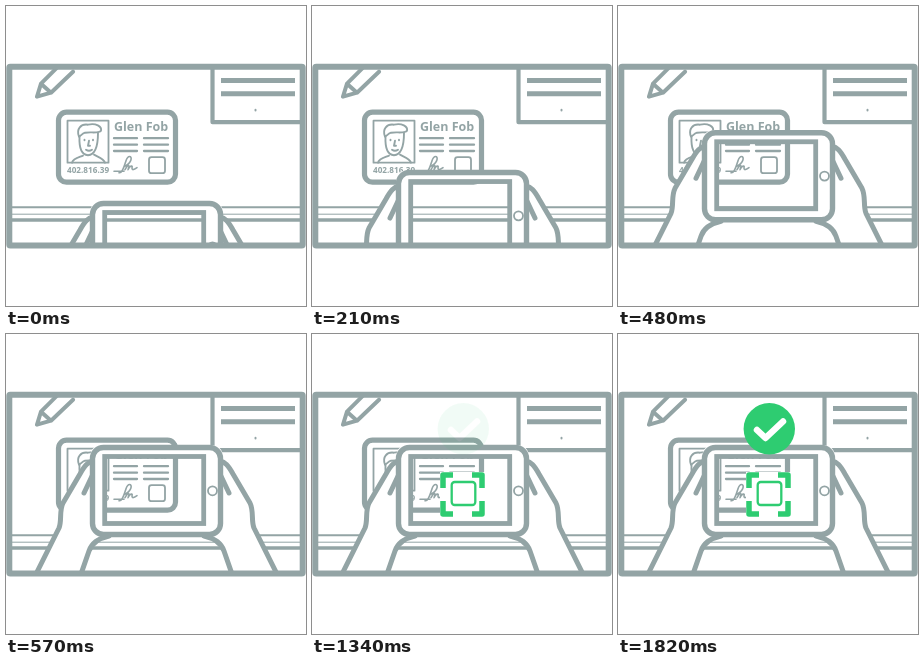
Write an HTML page that moves like this. It is 300x300 px and loops after 2.72 s.

```html
<!DOCTYPE html>
<html lang="en">
<head>
<meta charset="utf-8">
<title>Card scan</title>
<style>
  html, body { margin: 0; width: 100%; height: 100%; overflow: hidden; background: #fff; }
  svg { display: block; width: 100%; height: 100%; }
  .line { fill: none; stroke: #93a4a5; stroke-linecap: round; stroke-linejoin: round; }
  .solid { fill: #fff; }
  .green { fill: none; stroke: #2ecc71; stroke-linejoin: round; }
  text { font-family: "Open Sans", "Noto Sans", sans-serif; font-weight: 700; fill: #93a4a5; }
</style>
</head>
<body>
<svg viewBox="0 0 300 300">
  <defs>
    <clipPath id="desk"><rect x="4" y="61" width="292" height="178"/></clipPath>
    <g id="arm">
      <path class="solid" d="M30 240L53 194C56 187 53 177 57 169L74 140C79 131 82 128 87 127L92 140V202H103C94 204 86 208 83 217L75 240Z"/>
      <path class="line" stroke-width="5" d="M30 240L53 194C56 187 53 177 57 169L74 140C79 131 82 128 87 127M87 140L78 159M103 202C94 204 86 208 83 217L75 240"/>
    </g>
  </defs>

  <g clip-path="url(#desk)">
    <g class="line" transform="translate(0 .7)">
      <path stroke-width="2" d="M4 200.500H296"/>
      <path stroke-width="1" d="M4 207.500H296"/>
      <path stroke-width="3.400" d="M4 213.300H296"/>
      <path stroke-width="4.200" d="M206.500 60V115.500H297"/>
      <path stroke-width="5" stroke-linecap="butt" d="M215 73.800H289M215 87H289"/>
      <path stroke-width="2" d="M249.500 103v.8"/>
      <path stroke-width="4" d="M51 61L35 77L31 90L45 86L67 65M35 77L45 86"/>
    </g>

    <g id="card" transform="translate(0 .7)">
      <rect class="line solid" stroke-width="5.200" x="52.500" y="105.500" width="117" height="70" rx="8"/>
      <rect class="line" stroke-width="1.800" x="61.500" y="114" width="41" height="42"/>
      <g class="line" stroke-width="1.900">
        <path d="M73 130C70 122 75 117 82 118C90 116 96 120 95 124C93 127 85 125 79 126C76 127 75 129 73 130Z"/>
        <path d="M73.500 130C73 141 76 148 82 148.500C89 148 92 141 92 126"/>
        <path d="M78.500 133v.5M87 133v.5M83 134L82 139H84M80 143Q83 145 86 143"/>
        <path d="M66 156C67 152 72 151 77 149M88 148C94 151 98 152 99 156"/>
      </g>
      <text x="108" y="124.500" font-size="12.5">Glen Fob</text>
      <text x="61" y="166.500" font-size="8.2">402.816.39</text>
      <path class="line" stroke-width="2.300" stroke-linecap="butt" d="M108 131.500H131M138 131.500H162M108 138H131M138 138H162M108 144.300H131M138 144.300H162"/>
      <path class="line" stroke-width="1.600" d="M108 164.500H118M113 166C116 167 118 160 120 154C122 148 126 149 125 153C124 157 120 159 118 160M119 163C121 159 123 157 123 160L122 163C124 159 127 158 126 161C126 164 128 163 131 161"/>
      <rect class="line" stroke-width="1.800" x="143" y="150.500" width="16" height="16" rx="2.500"/>
    </g>

    <g id="hands">
      <use href="#arm"/>
      <use href="#arm" transform="translate(301 0) scale(-1 1)"/>
      <path class="solid" fill-rule="evenodd" d="M97 111H204Q217 111 217 124V189Q217 202 204 202H97Q84 202 84 189V124Q84 111 97 111ZM99 122V189H198V122Z"/>
      <rect class="line" stroke-width="5.400" x="86.500" y="113.500" width="128" height="87" rx="11"/>
      <rect class="line" stroke-width="4.800" x="98.700" y="122.500" width="99" height="67" style="stroke-linejoin:miter"/>
      <circle class="line" stroke-width="1.800" cx="206.500" cy="156.800" r="4.500"/>
    </g>
  </g>

  <rect class="line" stroke-width="6" x="3.300" y="60.700" width="293.400" height="178.800" rx="1"/>

  <g id="scan">
    <rect class="solid" x="128" y="138" width="45" height="45"/>
    <path class="green" stroke-width="5.500" d="M131 154V141H141M160 141H170V154M170 167V180H160M141 180H131V167"/>
    <rect class="green" stroke-width="2.300" x="139.700" y="148" width="23.600" height="23" rx="3"/>
  </g>

  <g id="check">
    <circle cx="151.300" cy="94.800" r="25.700" fill="#2ecc71"/>
    <path d="M139 96L147.500 104L165 87.500" fill="none" stroke="#fff" stroke-width="6.500" stroke-linecap="round" stroke-linejoin="round"/>
  </g>
</svg>
<script>
  const LOOP = 2720, STEP = 30, RISE = 84, RISE_STEPS = 19;
  const SCAN_STEPS = 6, CHECK_STEPS = 17;
  const hands = document.getElementById("hands");
  const scan = document.getElementById("scan");
  const check = document.getElementById("check");

  // Share of the steps completed since the first visible change.
  const progress = (time, first, count) =>
    Math.max(0, Math.min(count, Math.floor((time - first) / STEP) + 1)) / count;

  function draw(time) {
    const rise = progress(time, STEP, RISE_STEPS);
    hands.setAttribute("transform", `translate(0 ${RISE * (1 - rise)})`);
    scan.setAttribute("opacity", progress(time, 930, SCAN_STEPS));
    check.setAttribute("opacity", progress(time, 1340, CHECK_STEPS));
  }

  const start = performance.now();
  function tick() {
    draw((performance.now() - start) % LOOP);
    requestAnimationFrame(tick);
  }
  tick();
</script>
</body>
</html>
```
